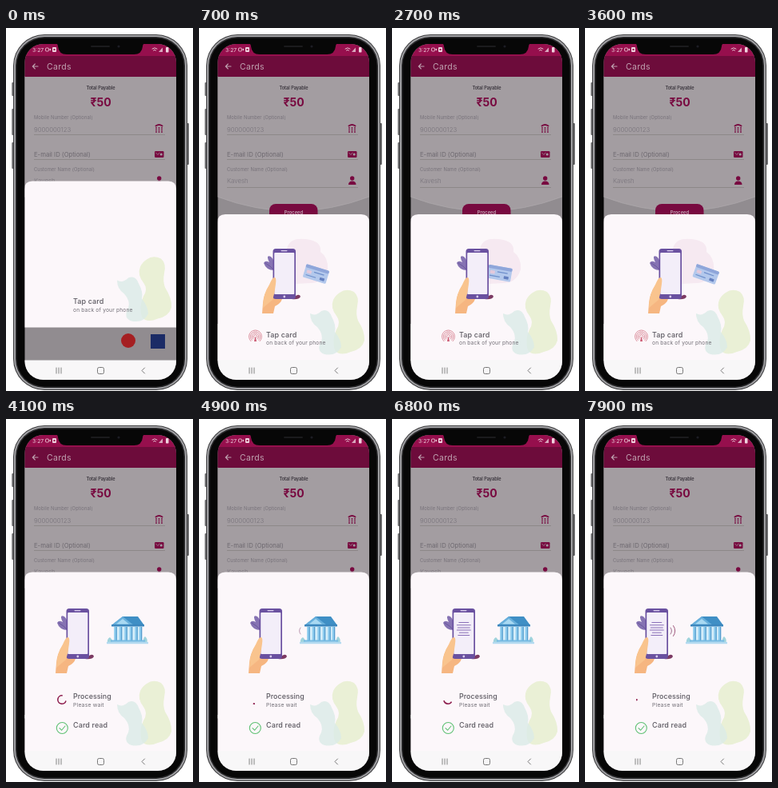
Animation of 234x454 px, one loop 8000 ms. Source, as an HTML page:

```html
<!DOCTYPE html>
<html lang="en">
<head>
<meta charset="utf-8">
<title>Card payment</title>
<style>
html, body { margin: 0; width: 100%; height: 100%; overflow: hidden; background: #fff; }
svg { display: block; width: 100vw; height: 100vh; }
text { font-family: Inter, "Open Sans", sans-serif; }
</style>
</head>
<body>
<svg id="stage" viewBox="0 0 234 454" xmlns="http://www.w3.org/2000/svg"></svg>
<script>
const LOOP = 8000;
const MAROON = '#780a40';
const SHEET = '#fcf7fa';
const PAGE = '#a39da1';

const text = (x, y, size, fill, str, extra = '') =>
  `<text x="${x}" y="${y}" font-size="${size}" fill="${fill}" ${extra}>${str}</text>`;
const rect = (x, y, w, h, fill, r = 0, extra = '') =>
  `<rect x="${x}" y="${y}" width="${w}" height="${h}" rx="${r}" fill="${fill}" ${extra}/>`;
const circle = (x, y, r, fill, extra = '') =>
  `<circle cx="${x}" cy="${y}" r="${r}" fill="${fill}" ${extra}/>`;
const path = (d, fill, extra = '') => `<path d="${d}" fill="${fill}" ${extra}/>`;
const stroke = (d, color, width, extra = '') =>
  path(d, 'none', `stroke="${color}" stroke-width="${width}" stroke-linecap="round" ${extra}`);

const LINE_WIDTHS = [13, 18, 16, 18, 12, 15];

// Hand holding a phone, shared by both illustrations
function device(name) {
  const lines = LINE_WIDTHS.map((w, i) =>
    rect(106.8 - w / 2, 293 + i * 3.2, w, 1, '#8a70b8', 0.5, `data-w="${w}"`)).join('');
  return path('M94 303Q84 303 81 294Q83 290 88 293Q83 283 90 286Q95 290 94 303Z', '#8673b3')
    + stroke('M83 294Q89 297 94 303', '#55458b', 0.6)
    + path('M79 357L80 344Q81 332 88 322L96 334L104 339Q102 345 95 348L93 357Z', '#f6b681')
    + path('M116 338Q117 333 121 335Q126 332 127 336Q125 340 116 339Z', '#7c3a63')
    + rect(92.5, 276, 28.5, 63, '#6a51a0', 3.5)
    + rect(94.2, 281, 25.1, 52, '#f3eef9', 1)
    + rect(102.5, 278, 8, 1.2, '#d9cdee', 0.6)
    + circle(106.8, 336, 1.4, '#d9cdee')
    + `<g id="${name}">${lines}</g>`
    + path('M80 350Q80 333 88 321Q92 311 95 312Q97 313 96 320Q95 331 92 340Z', '#f9c48e');
}

function bank() {
  const columns = [137, 143.5, 150, 156.5, 163, 168.5].map(x =>
    rect(x - 1.7, 260, 3.4, 17, '#8ccbee', 0.4) + rect(x + 0.6, 260, 1.1, 17, '#4f97c9')).join('');
  return path('M127 281Q126 275 130 273Q134 276 133 281Z', '#9fd3dc')
    + path('M172 281Q171 274 174 272Q178 275 176 281Z', '#9fd3dc')
    + rect(135, 259, 35, 19, '#d5edf9')
    + path('M132 258L146 247H165L173 258Z', '#3f8fc5')
    + path('M132 258L146 247L160 258Z', '#68b0dc') + path('M138 256.500L146 250L154 256.500Z', '#a9d9f2')
    + rect(132, 257, 41, 2.6, '#3b86bd', 0.5) + columns
    + rect(131, 276.5, 43, 2.3, '#75bae2') + rect(126, 278.8, 52, 2.5, '#b3daf0', 0.6);
}

function form() {
  const field = y => rect(35, y, 164, 0.7, '#85807f');
  const label = (y, str) => text(35, y, 5.8, '#77727a', str, 'letter-spacing=".12"');
  const value = (y, str) => text(35, y, 7.8, '#77727a', str, 'font-weight="300"');
  const keys = [188, 191.5, 195].map(x =>
    [125, 127.5, 130].map(y => circle(x, y, 0.9, MAROON)).join('')).join('');
  return rect(23, 20, 190, 420, '#918c90')
    + path('M23 60H213V211Q118 247 23 211Z', PAGE)
    + stroke('M23 211Q118 247 213 211', '#aea9ac', 0.7)
    + rect(23, 19, 190, 18, '#960f4d') + rect(23, 35, 190, 26, '#6d0c3b')
    + text(33, 30, 6.8, '#efd3df', '3:27')
    + rect(49.5, 25, 4, 4, 'none', 1, 'stroke="#efd3df" stroke-width=".8"')
    + path('M54 27L56 25.500V28.500Z', '#efd3df')
    + rect(58, 24, 5, 6, '#efd3df', 1) + rect(59.5, 26, 2, 2, '#960f4d')
    + stroke('M183 26Q186 23.500 189 26M184.500 28Q186 26.500 187.500 28', '#efd3df', 0.9)
    + path('M191 30L196 24.500V30Z', '#d9a9bf') + rect(200, 24, 3.5, 6.5, '#efd3df', 0.7)
    + stroke('M40 48H33.500M36.300 45L33.300 48L36.300 51', '#c0a3b1', 1.1)
    + text(51, 51.7, 10.5, '#c0a3b1', 'Cards', 'letter-spacing=".3"')
    + text(118.5, 76.5, 5.6, '#37323a', 'Total Payable', 'font-weight="600" text-anchor="middle"')
    + text(118.5, 98, 14, MAROON, '₹50', 'font-weight="700" text-anchor="middle"')
    + label(114, 'Mobile Number (Optional)')
    + value(129.5, '9000000123') + field(133)
    + stroke('M187.500 122.500Q191.500 119.500 195.500 122.500', MAROON, 2) + keys
    + text(35, 160.5, 7.7, '#6d686f', 'E-mail ID (Optional)') + field(164)
    + rect(186, 154, 11.5, 8, MAROON, 1.2)
    + stroke('M187.500 156L190 158.500L192 156', PAGE, 0.7) + circle(194.2, 158, 1.5, PAGE)
    + label(179, 'Customer Name (Optional)')
    + value(193.5, 'Kavesh') + field(199)
    + circle(191.7, 188, 2.7, MAROON) + path('M187 196Q187 191.500 191.700 191.500Q196.500 191.500 196.500 196Z', MAROON)
    + rect(88, 220, 60.5, 24, '#780a40', 8)
    + text(118.5, 233, 5.8, '#c3a9b6', 'Proceed', 'font-weight="600" text-anchor="middle"')
    + circle(153, 391, 9, '#a51f22') + rect(181, 383, 18, 18, '#1b2b66');
}

const blobs = path('M176 331Q184 325 194 330Q201 336 198 348Q196 358 199 366Q208 380 207 391Q204 402 190 405Q176 411 170 403Q166 390 172 377Q178 368 172 360Q164 350 168 340Q171 334 176 331Z', '#eaf0d6')
  + path('M139 357Q146 361 153 354Q162 350 166 361Q172 372 170 380Q178 390 178 399Q172 411 157 408Q146 404 153 392Q156 383 148 374Q139 368 139 357Z', '#dbebe8', 'opacity=".8"');

const tapIcon = [2.3, 4.2, 6.1, 8].map(r => {
  const dx = r * 0.7, dy = r * 0.71;
  return stroke(`M${70.5 - dx} ${386 + dy}A${r} ${r} 0 1 1 ${70.5 + dx} ${386 + dy}`, '#d98593', 0.9);
}).join('') + path('M69 392L70.500 385L72 392Z', '#cc5a72');

const waves = (id, x, dir) => `<g id="${id}">`
  + stroke(`M${x} 261q${3 * dir} 4 0 8`, '#a0708f', 1)
  + stroke(`M${x + 3.5 * dir} 258.5q${4.5 * dir} 6.5 0 13`, '#a0587d', 1) + '</g>';

const sheet = `<g id="sheet">
  ${path('M23 243Q23 233 33 233H203Q213 233 213 243V416H23Z', SHEET)}</g>
  ${rect(23, 370, 190, 46, SHEET, 0, 'id="sheetTail"')}
  <g id="blobs">${blobs}</g>
  <g id="tapArt">
    ${path('M109 285Q109 265 124 264Q137 263 147 268Q153 272 152 280Q162 287 161 302Q156 318 141 319L120 320Q108 311 109 285Z', '#f6e9f1')}
    <g id="card">
      ${rect(-15, -8.5, 30, 17, '#b3c8ec', 1.5)}${rect(-15, -8.5, 30, 4, '#8fa6da', 1.5)}
      ${rect(-12, -2, 6, 4, '#e3c9dc', 0.7)}${rect(-3, -2, 13, 1.2, '#6f8fcb')}
      ${rect(-12, 4, 13, 1.2, '#6f8fcb')}${rect(6, 2.5, 6, 3.5, '#6480c0', 0.6)}
    </g>${device('tapLines')}${tapIcon}
  </g>
  <g id="tapText">${text(84, 386.5, 9, '#5d5a62', 'Tap card', 'font-weight="500" letter-spacing=".1"')}
    ${text(84, 396.3, 6.7, '#716e76', 'on back of your phone', 'letter-spacing=".15"')}</g>
  <g id="work">
    <g transform="translate(-17 -39)">${device('workLines')}</g>${bank()}
    ${waves('bankWaves', 127, -1)}${waves('phoneWaves', 107, 1)}
    <path id="spinner" fill="none" stroke="#8d1d4d" stroke-width="1.6"/>
    ${text(84, 349.5, 8.9, '#5d5a62', 'Processing', 'font-weight="500" letter-spacing=".05"')}
    ${text(84, 359.5, 6.8, '#716e76', 'Please wait', 'letter-spacing=".2"')}
    ${circle(70.3, 386.5, 7, 'none', 'stroke="#5fc174" stroke-width="1.1"')}
    ${stroke('M67 386.700L69.600 389.300L74 384', '#5fc174', 1.1)}
    ${text(84, 386, 9, '#5d5a62', 'Card read', 'font-weight="500" letter-spacing=".1"')}
  </g>`;

const buttons = [[7.3, 68, 17], [7.3, 101, 33], [7.3, 143, 33], [226, 119, 52]]
  .map(([x, y, h]) => rect(x, y, 3, h, '#6a6a6c', 1)).join('');

const BEZEL = [[0, '#3c3c3e'], [1, '#a2a2a5'], [3, '#2b2b2d'], [4.5, '#070707']];
const frame = buttons + BEZEL.map(([inset, color]) =>
  rect(9 + inset, 8 + inset, 218 - 2 * inset, 445 - 2 * inset, color, 39 - inset)).join('');

const nav = rect(23, 415.5, 190, 26, '#f8f7f8')
  + stroke('M63 425V432M66 425V432M69 425V432', '#777', 0.9)
  + rect(114.5, 424.5, 8, 8, 'none', 2, 'stroke="#777" stroke-width="1"')
  + stroke('M173.500 425L170 428.500L173.500 432', '#777', 1);

const notch = path('M60 18H176Q171 19 171 23Q170 33 160 33H76Q66 33 65 23Q65 19 60 18Z', '#070707')
  + rect(106, 22, 24, 2, '#1b1b1d', 1) + circle(141, 23, 1.6, '#1c1d24');

document.getElementById('stage').innerHTML =
  `<defs><clipPath id="screen">${rect(23.5, 20, 189.5, 420, '#000', 23)}</clipPath></defs>`
  + frame + `<g clip-path="url(#screen)">${form()}${sheet}${nav}</g>` + notch;

const parts = Object.fromEntries(['sheet', 'sheetTail', 'blobs', 'tapArt', 'card', 'tapLines', 'tapText',
  'work', 'workLines', 'bankWaves', 'phoneWaves', 'spinner'].map(id => [id, document.getElementById(id)]));

const ramp = (t, from, to) => Math.min(1, Math.max(0, (t - from) / (to - from)));
const ease = (t, from, to) => { const u = ramp(t, from, to); return u * u * (3 - 2 * u); };
const shift = (node, y) => node.setAttribute('transform', `translate(0 ${y})`);
const fade = (node, a) => node.setAttribute('opacity', a);

function growLines(group, amount) {
  [...group.children].forEach((line, i) =>
    line.setAttribute('width', line.dataset.w * ramp(amount * 6, i, i + 1)));
}

function pulse(group, amount) {
  [...group.children].forEach((arc, i) => fade(arc, ramp(amount * 2, i, i + 1)));
}

function spin(t) {
  const cycle = (t - 4900) / 1500, turn = Math.floor(cycle), u = cycle - turn;
  const base = 90 + cycle * 307.5 + turn * 270;
  const tail = base + 270 * ease(u, 0.6, 1);
  const head = base + 270 * ease(u, 0, 0.6) + 25;
  const point = deg => {
    const a = deg * Math.PI / 180;
    return `${70 + 5.2 * Math.cos(a)} ${351 + 5.2 * Math.sin(a)}`;
  };
  parts.spinner.setAttribute('d', `M${point(tail)}A5.2 5.2 0 ${head - tail > 180 ? 1 : 0} 1 ${point(head)}`);
}

function render(t) {
  const drop = ease(t, 30, 330), rise = ease(t, 3700, 4050);
  const lift = -41.5 * (1 - drop);
  shift(parts.sheet, lift - 41.5 * rise);
  shift(parts.blobs, lift);
  shift(parts.tapText, lift);
  // The tail keeps the raised sheet closed at its foot
  fade(parts.sheetTail, drop < 1 ? 0 : 1);

  const gone = 1 - ramp(t, 3700, 3900);
  fade(parts.tapArt, ramp(t, 250, 450) * gone);
  fade(parts.tapText, gone);
  fade(parts.work, ramp(t, 3900, 4100));

  const p = t % 3000;
  const away = 1 - ease(p, 550, 1150) + ease(p, 2450, 2950);
  parts.card.setAttribute('transform',
    `translate(${117 + 35 * away} ${305.5 + 2.5 * away}) rotate(${20 * away})`);
  growLines(parts.tapLines, p < 2500 ? ramp(p, 1150, 1700) : 0);

  growLines(parts.workLines, ramp(t, 4950, 5600));
  pulse(parts.bankWaves, t < 6400 ? ramp(t, 4750, 5200) : 0);
  pulse(parts.phoneWaves, ramp(t, 6900, 7500));
  spin(t);
}

function tick() {
  render(performance.now() % LOOP);
  requestAnimationFrame(tick);
}
tick();
</script>
</body>
</html>
```
